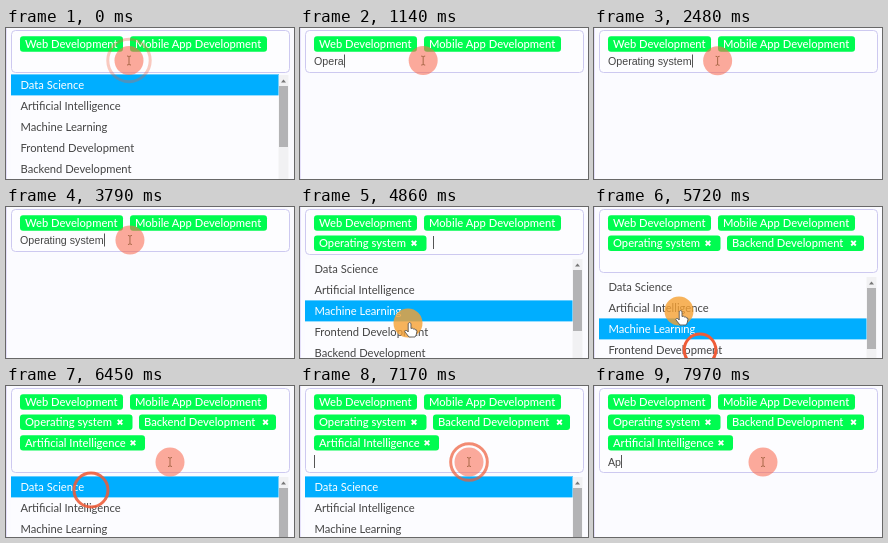
These frames come from a looping animation (288x151 px, 8 s). An HTML page:

```html
<!DOCTYPE html>
<html lang="en">
<head>
<meta charset="utf-8">
<title>Tag input</title>
<style>
  html, body { margin: 0; width: 100%; height: 100%; overflow: hidden; background: #fbfbff; }
  svg { display: block; width: 288px; height: 151px; }
  text { font: 11.2px Lato, sans-serif; fill: #444; white-space: pre; }
  .tag rect { fill: #00fc50; }
  .tag text { fill: #fff; font-weight: 500; }
  .tag path { stroke: #fff; stroke-width: 1.9; }
  .typed { font: 10.67px "Liberation Sans", Arial, sans-serif; }
</style>
</head>
<body>
<svg viewBox="0 0 288 151">
  <path d="M.5 0V151" stroke="#e5e0fa"/>
  <rect id="box" x="5.5" y="2.5" width="278" rx="4" fill="#fdfdff" stroke="#cdc9f0"/>
  <g id="tags"></g>
  <text id="typed" class="typed" x="14"></text>
  <rect id="caret" width="1" height="13" fill="#555"/>
  <g id="list">
    <rect x="5" width="278" height="110" fill="#fcfcff"/>
    <rect id="hover" x="5" width="268" height="21" fill="#00aeff"/>
    <g id="rows"></g>
    <rect x="272.5" width="10" height="110" fill="#f1f1f3"/>
    <path d="M275 7.5h5l-2.5-3z" fill="#777"/>
    <rect x="273" y="11" width="9" height="61" fill="#b3b3b5"/>
  </g>
  <circle id="ring" fill="none" stroke="#ee5c38" stroke-width="3"/>
  <g id="pointer">
    <circle id="halo" r="14.5"/>
    <path id="beam" d="M-2 -4.5Q0 -4.5 0 -3.5Q0 -4.5 2 -4.5M0 -3.5V3.5M-2 4.5Q0 4.5 0 3.5Q0 4.5 2 4.5"
      fill="none" stroke="#a0603f" stroke-width=".9"/>
    <path id="hand" d="M.2 .5Q1.8 -1.5 3 .5V5.5Q4.5 4.5 5.3 6Q6.8 5.2 7.2 6.8Q9 6.3 8.9 8.5L8.2 12L7 14H1L-3.2 8.7Q-2.8 6.7 -1.2 7.6L.2 9Z"
      fill="#fff" stroke="#555" stroke-width=".9" stroke-linejoin="round"/>
  </g>
</svg>
<script>
const LOOP = 8000, ENTER = 3800, PICK_BACKEND = 5560, PICK_AI = 6240, FOCUS = 6900;
const $ = id => document.getElementById(id);

function add(parent, name, attrs, text = '') {
  const el = document.createElementNS('http://www.w3.org/2000/svg', name);
  set(el, attrs);
  el.textContent = text;
  return parent.appendChild(el);
}
function set(el, attrs) {
  for (const key in attrs) el.setAttribute(key, attrs[key]);
}
const show = (el, on) => { el.style.display = on ? '' : 'none'; };
const latest = (steps, t) => steps.filter(step => step[0] <= t).pop();

// label, left, top, width, time of appearance, x of the close mark
const tags = [
  ['Web Development', 14, 8.3, 103, 0],
  ['Mobile App Development', 124, 8.3, 137, 0],
  ['Operating system', 14, 28.5, 112.5, ENTER, 114],
  ['Backend Development', 133, 28.5, 137, PICK_BACKEND, 259.5],
  ['Artificial Intelligence', 14, 49.2, 125, PICK_AI, 127]
].map(([label, x, y, width, from, mark]) => {
  const g = add($('tags'), 'g', { class: 'tag' });
  add(g, 'rect', { x, y, width, height: 15.4, rx: 3 });
  add(g, 'text', { x: x + 5, y: y + 11.4 }, label);
  if (mark) add(g, 'path', { d: `M${mark - 2.3} ${y + 5.4}l4.6 4.6m0 -4.6l-4.6 4.6` });
  return { g, from };
});

const rows = ['Data Science', 'Artificial Intelligence', 'Machine Learning',
  'Frontend Development', 'Backend Development']
  .map((label, i) => add($('rows'), 'text', { x: 14.5, y: i * 21 + 14.3 }, label));

// time, box bottom, list top, input centre, input left
const layouts = [
  [0, 45, 47, 33.5, 14],
  [ENTER, 48, 52, 36, 133],
  [PICK_BACKEND, 66, 70, 56, 14],
  [PICK_AI, 87, 91, 76, 14]
];
const hovers = [[0, 0], [4530, 1], [4660, 2], [4980, 3], [5160, 4],
  [PICK_BACKEND, 3], [5650, 2], [5760, 1], [PICK_AI, 0]];
const path = [[0, 123, 32.5], [4250, 124, 33], [4600, 112, 95], [4860, 108, 116],
  [5200, 106, 143], [PICK_BACKEND, 106, 143], [5720, 85, 104], [5800, 85, 104],
  [PICK_AI, 85, 104], [6450, 164, 76], [6650, 169, 76], [LOOP, 169, 76]];
const clicks = [[-400, 123, 32.5], [PICK_BACKEND, 106, 143], [PICK_AI, 85, 104], [FOCUS, 169, 76]];

const spells = [
  { text: 'Operating', start: 560, step: 125, end: ENTER },
  { text: ' system', start: 1690, step: 125, end: ENTER },
  { text: 'Ap', start: 7600, step: 200, end: LOOP }
];
const typedAt = t => spells.map(({ text, start, step, end }) =>
  t < start || t >= end ? '' : text.slice(0, Math.floor((t - start) / step) + 1)).join('');

function pointerAt(t) {
  const i = path.findIndex(p => p[0] > t);
  const [t0, x0, y0] = path[i - 1], [t1, x1, y1] = path[i];
  const u = (t - t0) / (t1 - t0), e = u * u * (3 - 2 * u);
  return [x0 + (x1 - x0) * e, y0 + (y1 - y0) * e];
}

function caretOn(t) {
  if (t < 200 || (t >= PICK_BACKEND && t < FOCUS)) return false;
  if ((t >= 560 && t < 2440) || t >= 7600) return true;
  const since = t < 560 ? 200 : t < ENTER ? 2440 : t < FOCUS ? ENTER : FOCUS;
  return (t - since) % 1000 < 500;
}

function draw(t) {
  const [, bottom, top, middle, left] = latest(layouts, t);
  set($('box'), { height: bottom - 3 });
  tags.forEach(({ g, from }) => show(g, t >= from));

  const typed = $('typed');
  typed.textContent = typedAt(t);
  set(typed, { y: middle + 3.8 });
  const advance = typed.textContent ? typed.getComputedTextLength() : 0;
  set($('caret'), { x: Math.round(left + advance), y: middle - 7 });
  show($('caret'), caretOn(t));

  const hovered = latest(hovers, t)[1];
  show($('list'), t < 560 || (t >= ENTER && t < 7600));
  set($('list'), { transform: `translate(0 ${top})` });
  set($('hover'), { y: hovered * 21 - 0.6 });
  rows.forEach((row, i) => { row.style.fill = i === hovered ? '#fff' : ''; });

  const [x, y] = pointerAt(t);
  const overList = t > ENTER && t < 7600 && y > top;
  set($('pointer'), { transform: `translate(${x} ${y})` });
  set($('halo'), { fill: overList ? 'rgba(245,160,50,.8)' : 'rgba(250,105,80,.57)' });
  show($('hand'), overList);
  show($('beam'), !overList);

  const [at, cx, cy] = latest(clicks, t), age = t - at;
  show($('ring'), age < 560);
  set($('ring'), { cx, cy, r: 12.3 + age / 45, opacity: Math.max(0, Math.min(1, 1.5 - age / 340)) });
}

const begin = performance.now();
function frame() {
  draw((performance.now() - begin) % LOOP);
  requestAnimationFrame(frame);
}
frame();
</script>
</body>
</html>
```
